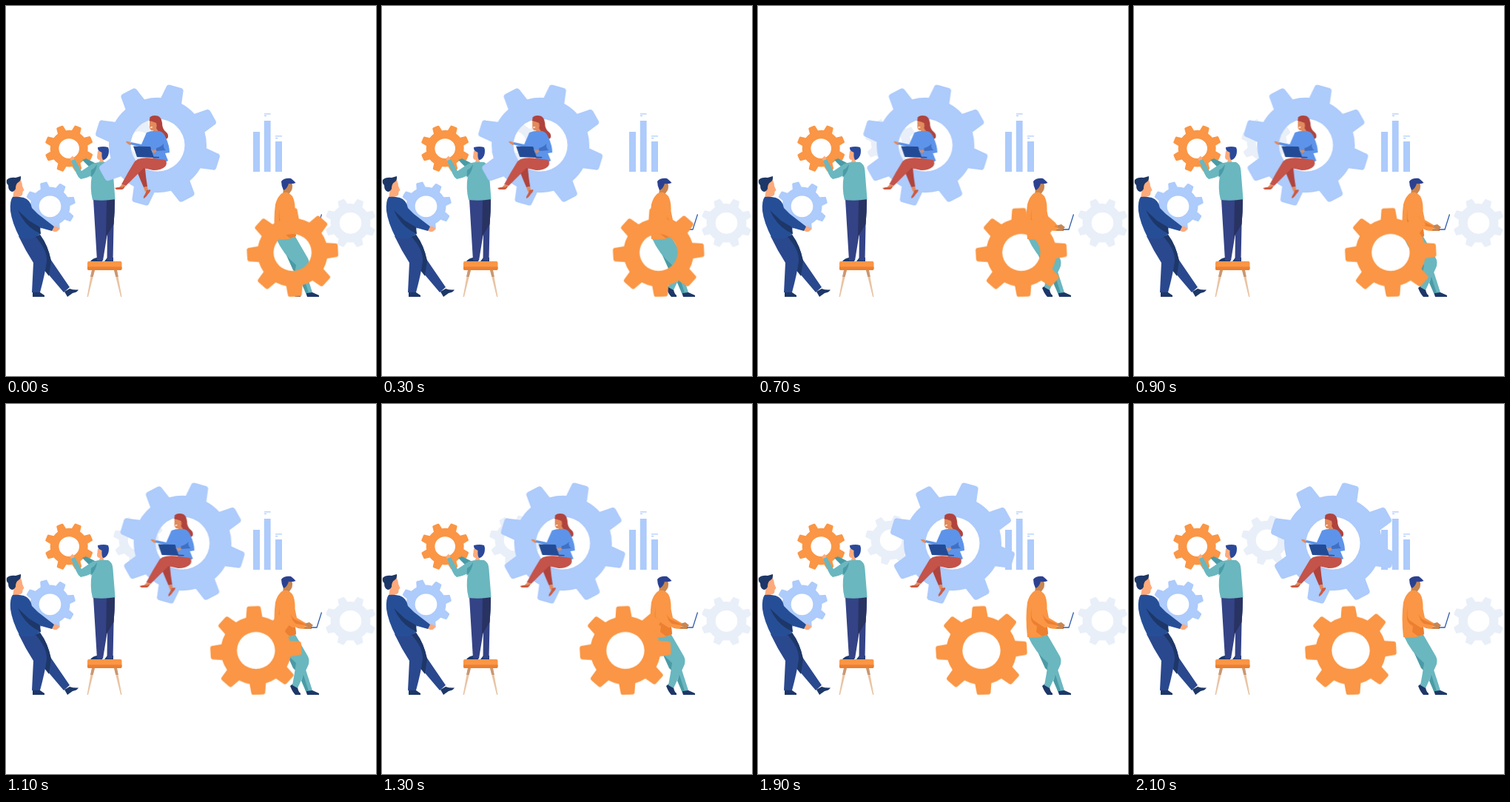
Recreate the animation shown at these times as an HTML page. Size 500x500 px, loop 4100 ms.

```html
<!DOCTYPE html>
<html lang="en">
<head>
<meta charset="utf-8">
<title>Team and gears</title>
<style>
html, body { margin: 0; width: 100%; height: 100%; overflow: hidden; background: #fff; }
svg { display: block; width: 100%; height: 100%; }
.sky { fill: #adcbfb; }
.pale { fill: #e9eff8; }
.orange { fill: #fa9645; }
.rust { fill: #ec7f30; }
.teal { fill: #6ab7bf; }
.sea { fill: #4a9ba6; }
.navy { fill: #264e97; }
.indigo { fill: #2a488e; }
.plum { fill: #344386; }
.dusk { fill: #283362; }
.dark { fill: #1d3768; }
.peach { fill: #fdaa7b; }
.tan { fill: #e28a5c; }
.brown { fill: #c98550; }
.red { fill: #c4534a; }
.wine { fill: #b0433d; }
.blue { fill: #5d94e9; }
</style>
</head>
<body>
<svg viewBox="0 0 500 500">
  <g class="sky">
    <path d="M334 170h9v54h-9zM348.800 155h8.800v69h-8.800zM364 183h9v41h-9z"/>
    <path d="M349 145.300h8.600v1.300h-8.600zM349 147.800h3v1.300h-3zM364 175.300h9v1.300h-9zM364 178h3.200v1.300h-3.200z"/>
  </g>
  <g id="back"></g>

  <g id="lifted"></g>

  <g id="carrier">
    <path class="dark" d="M79 386L86 382Q91 384 98 383.500Q96 387 90 388L83 393ZM36 387H46L52 391V393H36Z"/>
    <path class="indigo" d="M36 312L46 309Q57 324 60 342L86 380L78 387L50 354L40 330Z"/>
    <path class="dark" d="M40 312L46 309Q57 324 61 344L58 365L51 356Z"/>
    <path class="indigo" d="M17 311L39 311Q56 329 55 345Q53 361 46 387H35L37 347Q26 330 17 311Z"/>
    <path class="peach" d="M12 241L20 235Q22 240 22 243L24.500 249L22.500 251Q23 258 17 257L20 261L9 260Z"/>
    <path class="dark" d="M1 235Q5 231 13 232L20 230Q21 235 17 238Q13 240 13 247Q11 251 8 251Q3 250 3 242Q0 240 1 235Z"/>
    <path class="peach" d="M62 298Q69 297 72 300Q71 306 65 305L61 303Z"/>
    <path class="navy" d="M9 258Q15 257 24 259Q33 262 35 273L43 281L65 298L62 304L44 299L47 308L36 314L19 314Q8 293 6 277Q5 263 9 258Z"/>
    <path class="dark" d="M16 276L31 290L46 299L47 308L38 303Q24 294 16 276Z"/>
  </g>

  <g id="builder">
    <path d="M116 357h4l-9 36h-1.500zM146 357h4l6.500 36H155z" fill="#e9c4a4"/>
    <path d="M116 357h4l-2.500 9h-3.500zM146 357h4l1.800 9h-3.500z" fill="#c99873"/>
    <rect class="orange" x="110" y="345" width="46.500" height="12" rx="2"/>
    <path class="rust" d="M110 352.500H156.500V355Q156.500 357 154.500 357H112Q110 357 110 355Z"/>
    <path class="dark" d="M114 345Q117 341 123 340H131L130 345ZM133 345L137 340H145V345Z"/>
    <path class="plum" d="M118 261L147 260Q147 278 145.500 296L144.500 344H136.500L137 307L131 344H123Z"/>
    <path class="dusk" d="M136 262H147Q147 278 145.500 295L135 312Z"/>
    <path class="sea" d="M103 208L108 206L122 213L115 220Z"/>
    <path class="peach" d="M124 196L130 194L132 211L125 213L127 208Q123 208 123 204Z"/>
    <path d="M124 191Q132 189 138 191Q140 196 138 202Q135 208 131 208Q129 205 129.500 198L126 196Q124 195 124 191Z" fill="#2a489a"/>
    <path class="peach" d="M86.500 206L90 202.500L93 208L89 211Z"/>
    <path class="teal" d="M88 209L93 207L102 223L117 213Q126 210 138 211Q144 214 144.500 223L147.500 261Q133 264 117 262Q113 247 116 229Q108 233 101 234Q97 231 95 226Z"/>
    <path class="sea" d="M115 222Q120 219 123 214Q122 224 114.500 232Z"/>
  </g>

  <g id="sitter">
    <g id="bigBlue"></g>
    <path class="wine" d="M194 151Q197 147 205 148.500Q210 150 211 158Q211 166 216 170Q221 174 218 179Q214 181 211 177L201 169Z"/>
    <path class="tan" d="M194 153Q199 151 203 155Q205 159 203 165L207 171L198 173L199 168Q195 169 194 164Z"/>
    <path d="M195 163.500l3-.5q0 2-2.500 2z" fill="#fff"/>
    <path class="wine" d="M193.500 155Q195 148 203 149Q209 152 208 160L205 168L203 158Q198 156 193.500 155Z"/>
    <path class="tan" d="M162 183Q166 182 170 186L168 188Q163 186 162 183Z"/>
    <path class="blue" d="M190 171Q197 168 207 169Q213 170 216 178Q221 189 221 198L215 199L219 209Q212 214 199 209L197 194L183 191L168 187L169 184L183 187Z"/>
    <path d="M203 192Q210 190 213 186Q212 192 216 195L203 196Z" fill="#3f70c4"/>
    <path class="wine" d="M193 208L188 220Q189 232 191 244L186 245Q182 236 178 226Q181 214 188 207Z"/>
    <path class="red" d="M178 207Q186 204 201 206L215 208Q219 212 215 217Q210 222 199 222L186 219L162 243L156 241Q165 224 174 210Z"/>
    <path class="tan" d="M157 241l5 2-3 3-6-1zM186 245l5-1 1 5-4 2z"/>
    <path d="M147 246Q153 244 158 245L160 243Q161 246 157 248H149ZM190 249L195 248Q196 250 192 254Q189 259 186 260Q185 258 188 254Z" fill="#cb5b43"/>
    <path d="M172 189.500L195 190L200 205L177 204ZM199 203.500L207 204V205.200H199Z" fill="#234b95"/>
    <path class="tan" d="M197 196Q201 193 204 196L200 199Z"/>
  </g>

  <g id="typist">
    <path class="dark" d="M384 381L388 378L394 383Q395 389 398 391V393H391Q387 389 384 381ZM405 387H414L423 391V393H407Z"/>
    <path class="sea" d="M374 326L392 346L404 357L400 368L388 357Z"/>
    <path class="teal" d="M399 361L405 359L414 387L405 388Z"/>
    <path class="teal" d="M365 314L390 310L408 341Q411 347 408 354L394 384L387 380Q390 364 392 350Q374 335 365 314Z"/>
    <path class="sea" d="M399 374L402 366L409 388H405Z"/>
    <path class="brown" d="M376 239L386 239Q388 244 386 249Q383 252 382 257L374 255Z"/>
    <path d="M372 237Q376 232 385 233Q389 236 391.500 239Q387 241 382 240Q380 247 375 249Q372 243 372 237Z" fill="#2b4190"/>
    <path class="brown" d="M402 297L410 295L415 299L413 301L404 300ZM401 301L409 300Q414 301 413 304H403Z"/>
    <path class="orange" d="M373 253Q380 249 387 257Q391 264 390.500 277L393 289L405 296L403 304Q394 304 391 301L392 311Q382 317 364 315Q361 288 364 268Q367 257 373 253Z"/>
    <path class="rust" d="M370 274Q368 288 372 292Q379 297 387 302L391 302L392 311L384 314L376 308L377 300Q370 297 369 290Q368 282 370 274ZM385 284Q387 290 392 292L404 297V299L392 297Q386 293 385 284Z"/>
    <path d="M412 302H420L426.500 281.500" fill="none" stroke="#315fac" stroke-width="1.300"/>
  </g>
  <g id="roller"></g>
</svg>
<script>
const LOOP = 4100, MOVE = 2100, STEPS = 21;

// Eight tapered, rounded teeth around a ring; angles in degrees.
function gearPath({ R, root, hole, tip, base, turn }) {
  const round = R * .055;
  let d = '';
  for (let i = 0; i < 8; i++) {
    const a = (turn + i * 45) * Math.PI / 180;
    const at = (u, v) => (u * Math.cos(a) - v * Math.sin(a)).toFixed(2) + ' ' +
                         (u * Math.sin(a) + v * Math.cos(a)).toFixed(2);
    const foot = Math.sqrt(root * root - base * base);
    d += (i ? `A${root} ${root} 0 0 1 ` : 'M') + at(foot, -base) +
      `L${at(R - round, -tip)}Q${at(R, -tip)} ${at(R, -tip + round)}` +
      `L${at(R, tip - round)}Q${at(R, tip)} ${at(R - round, tip)}L${at(foot, base)}`;
  }
  const first = turn * Math.PI / 180 - Math.asin(base / root);
  d += `A${root} ${root} 0 0 1 ${root * Math.cos(first)} ${root * Math.sin(first)}Z`;
  return d + `M${hole} 0A${hole} ${hole} 0 1 0 ${-hole} 0A${hole} ${hole} 0 1 0 ${hole} 0Z`;
}

function addGear(parent, color, x, y, shape) {
  const path = document.createElementNS('http://www.w3.org/2000/svg', 'path');
  path.setAttribute('d', gearPath(shape));
  path.setAttribute('class', color);
  path.setAttribute('fill-rule', 'evenodd');
  path.setAttribute('transform', `translate(${x} ${y}) scale(1 .972)`);
  document.getElementById(parent).append(path);
}

const small = turn => ({ R: 34.5, root: 27, hole: 14.8, tip: 5, base: 6.2, turn });
addGear('back', 'pale', 179.5, 184, small(15));
addGear('back', 'pale', 465.5, 293.3, small(23));
addGear('bigBlue', 'sky', 205, 188, { R: 85, root: 66, hole: 36.5, tip: 12, base: 14.5, turn: 16.5 });
addGear('lifted', 'sky', 59.5, 270.8, small(-15));
addGear('lifted', 'orange', 85.2, 192.6, { R: 33, root: 25.5, hole: 13.8, tip: 5, base: 6, turn: 22 });
addGear('roller', 'orange', 387.2, 333, { R: 61.5, root: 47.5, hole: 25.7, tip: 9.5, base: 11, turn: -3 });

function slide(id, distance) {
  const end = `translateX(${distance}px)`;
  document.getElementById(id).animate([
    { transform: 'translateX(0px)', easing: `steps(${STEPS}, end)` },
    { transform: end, offset: MOVE / LOOP },
    { transform: end }
  ], { duration: LOOP, iterations: Infinity });
}
slide('sitter', 64);
slide('roller', -94.3);
</script>
</body>
</html>
```
